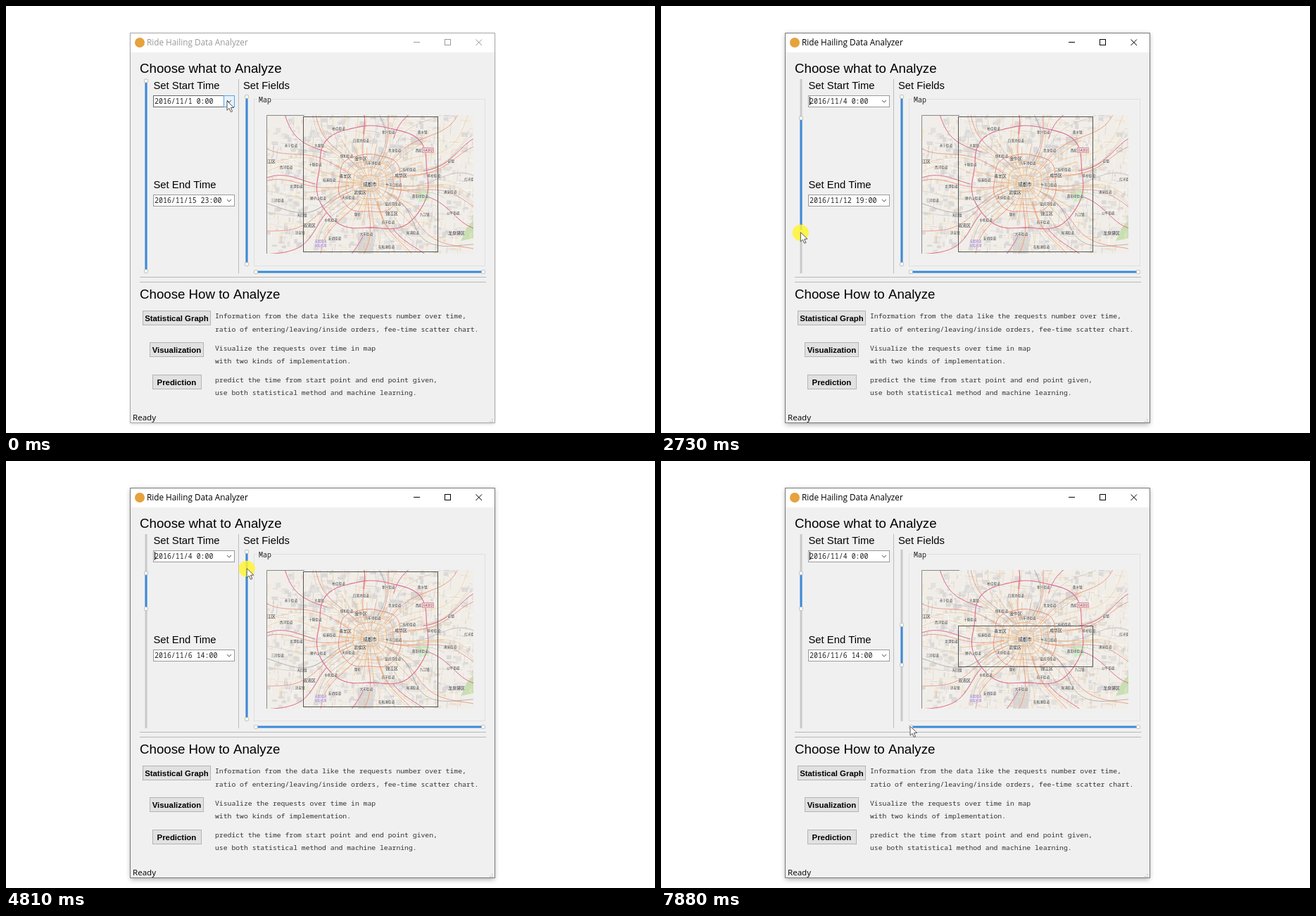
Animation of 922x607 px, one loop 8000 ms. Source, as an HTML page with a canvas:

```html
<!DOCTYPE html>
<html lang="en">
<head>
<meta charset="utf-8">
<title>Ride Hailing Data Analyzer</title>
<style>
html, body { margin: 0; width: 100%; height: 100%; overflow: hidden; background: #fff; }
canvas { display: block; width: 922px; height: 607px; }
</style>
</head>
<body>
<canvas id="stage" width="922" height="607"></canvas>
<script>
const LOOP = 8000;
const ctx = document.getElementById('stage').getContext('2d');
const ARIAL = '"Liberation Sans", Arial, sans-serif';
const UI = '"Open Sans", "Noto Sans CJK SC", sans-serif';
const CJK = '"Noto Sans CJK SC", "Noto Sans CJK", sans-serif';
const MONO = '"Noto Sans Mono", monospace';
const FIELD_FONT = '300 9.95px ' + MONO;
const BLUE = '#0078d7', TRACK = '#3b8ad8';

function makeRandom(seed) {
  return () => {
    seed = (seed * 1664525 + 1013904223) >>> 0;
    return seed / 4294967296;
  };
}

function label(g, text, x, y, font, color = '#000', align = 'left') {
  g.font = font;
  g.fillStyle = color;
  g.textAlign = align;
  g.fillText(text, x, y);
}

function box(g, x, y, w, h, fill, border) {
  if (fill) { g.fillStyle = fill; g.fillRect(x, y, w, h); }
  if (border) {
    g.strokeStyle = border;
    g.lineWidth = 1;
    g.strokeRect(x + .5, y + .5, w - 1, h - 1);
  }
}

function shape(g, points, fill, stroke, width = 1) {
  g.beginPath();
  points.forEach(([x, y]) => g.lineTo(x, y));
  if (fill) { g.closePath(); g.fillStyle = fill; g.fill(); }
  if (stroke) { g.strokeStyle = stroke; g.lineWidth = width; g.stroke(); }
}

function line(g, color, width, x1, y1, x2, y2) {
  shape(g, [[x1, y1], [x2, y2]], null, color, width);
}

function disc(g, x, y, r, fill, border) {
  g.beginPath();
  g.arc(x, y, r, 0, 2 * Math.PI);
  g.fillStyle = fill;
  g.fill();
  if (border) { g.strokeStyle = border; g.lineWidth = .8; g.stroke(); }
}

// ---- Map -----------------------------------------------------------------

const MAP = { x: 370, y: 155, w: 294, h: 197 };
const CITY = { x: 517, y: 254 };
const DISTRICTS = [
  ['金牛区', 504, 217], ['青羊区', 482, 242], ['成华区', 561, 241], ['武侯区', 503, 265],
  ['锦江区', 548, 295], ['双流区', 431, 312], ['龙泉驿区', 640, 323], ['温江区', 374, 221]
];
const TOWNS = ('牛市口街道 天府街道 万年场街道 猛追湾街道 桂溪街道 二仙桥街道 簇桥 保和街道 ' +
  '黄田坝街道 狮子山街道 青龙街道 石羊街道 十陵街道 蔡桥街道 中和街道 白莲池街道 九江镇 ' +
  '龙潭街道 西航港街道 大丰街道 大面镇 涌泉街道 天回镇 新兴街道 犀浦街道 西河街道 彭镇 ' +
  '安靖街道 柏合街道 公平街道 三河街道 黄水镇 石板滩街道 永宁街道 红光街道 洪安镇').split(' ');

// Line from radius a to b at the given angle, with a sideways swing
function radial(g, angle, a, b, swing, color, width) {
  const points = [];
  for (let r = a; r <= b; r += 6) {
    const q = angle + swing * Math.sin(r / 26 + angle * 5);
    points.push([CITY.x + r * Math.cos(q), CITY.y - 2 + r * Math.sin(q) * .9]);
  }
  shape(g, points, null, color, width);
}

function ring(g, r, color, width) {
  const points = [];
  for (let a = 0; a <= 6.4; a += .08) {
    const k = r * (1 + .05 * Math.cos(4 * a + 3) + .02 * Math.sin(7 * a));
    const lift = r > 60 ? 8 : 0;
    points.push([CITY.x + lift / 2 + k * Math.cos(a), CITY.y - 2 - lift + k * Math.sin(a) * .93]);
  }
  shape(g, points, null, color, width);
}

function drawStreets(g, rnd) {
  const spot = power => {
    const r = Math.pow(rnd(), power) * 180, a = rnd() * 2 * Math.PI;
    return [CITY.x + r * Math.cos(a), CITY.y + r * Math.sin(a) * .75];
  };
  for (let i = 0; i < 600; i++) {
    const [x, y] = spot(.7);
    box(g, x, y, 2 + rnd() * 7, 2 + rnd() * 6, i % 2 ? '#e3e0de' : '#dad8d8');
  }
  box(g, 500, 322, 22, 30, '#d8d6d5');
  box(g, 575, 186, 17, 12, '#d8d6d5');
  shape(g, [[583, 264], [602, 261], [601, 276], [588, 279]], '#c9efc3');
  shape(g, [[664, 304], [654, 316], [646, 334], [664, 330]], '#c9dfb1');

  const tones = ['#fff', '#f3dcb4', '#c9c7c7', '#f3ecc0', '#d0cecd', '#efc9a4'];
  for (let i = 0; i < 1300; i++) {
    const [x, y] = spot(.65);
    const a = .1 + i % 2 * Math.PI / 2, len = 4 + rnd() * 13;
    line(g, tones[Math.floor(rnd() * 6)], .4 + rnd() * .3,
      x, y, x + Math.cos(a) * len, y + Math.sin(a) * len);
  }
}

function drawRoads(g, rnd) {
  for (let i = 0; i < 40; i++)
    radial(g, i * 2.4 + rnd(), 20 + rnd() * 60, 110 + rnd() * 80, .12, i % 2 ? '#c4c1bf' : '#efc490', .6);
  for (let i = 0; i < 26; i++)
    radial(g, i * Math.PI / 13 + rnd() * .1, 9, 60 + rnd() * 50, .03, '#efb070', .7);
  [13, 25, 35].forEach(r => ring(g, r, '#f0ab72', .8));
  ring(g, 46, '#e98673', .9);
  for (let i = 0; i < 13; i++)
    radial(g, i * Math.PI / 6.5 + .2, 30, 190, .09, '#eb8c74', .8);
  ring(g, 82, '#dd6c8c', 1.1);
  for (let i = 0; i < 9; i++)
    radial(g, i * Math.PI / 4.5 + .35, 78, 190, .1, '#dd6c8c', 1);
  for (let i = 0; i < 3; i++)
    radial(g, i * 2.1 + .7, 25, 190, .16, '#8f8b8b', .6);
}

function drawNames(g) {
  const place = (text, x, y, size, color = '#222') => {
    g.font = size + 'px ' + CJK;
    g.textAlign = 'center';
    g.strokeStyle = 'rgba(250,248,244,.7)';
    g.lineWidth = 1;
    g.strokeText(text, x, y + size * .36);
    label(g, text, x, y + size * .36, g.font, color, 'center');
  };
  TOWNS.forEach((name, i) => {
    const r = 24 * Math.sqrt(i + 2), a = i * 2.4;
    place(name, CITY.x + r * Math.cos(a), CITY.y + r * Math.sin(a) * .64, 4.6, '#333');
  });
  DISTRICTS.forEach(([name, x, y]) => place(name, x, y, 5.9));
  place('成都市', CITY.x, CITY.y, 6.4);
  place('成都双流', 447, 334, 4.2, '#8461c4');
  place('国际机场', 447, 340, 4.2, '#8461c4');
  box(g, 591, 201, 17, 8, '#f3d3d6', '#dc93a0');
  place('G4202', 599.5, 205, 4.6, '#7c2438');
}

function drawMap() {
  const c = document.createElement('canvas');
  c.width = MAP.w;
  c.height = MAP.h;
  const g = c.getContext('2d'), rnd = makeRandom(21);
  g.translate(-MAP.x, -MAP.y);
  g.lineJoin = 'round';
  box(g, MAP.x, MAP.y, MAP.w, MAP.h, '#f1eee9');
  drawStreets(g, rnd);
  drawRoads(g, rnd);
  drawNames(g);
  shape(g, [[370.5, 352], [370.5, 155.5], [424, 155.5]], null, '#888');
  return c;
}

// ---- Timeline ------------------------------------------------------------

const glide = u => (u + u * u * (3 - 2 * u)) / 2;
const drag = u => Math.pow(u, 1.45);

const MOVES = [
  { from: 470, to: 1020, x: 321, y: 190, ease: glide },
  { from: 1350, to: 2140, x: 199, y: 378, ease: glide },
  { from: 2240, to: 3280, x: 197, y: 211, ease: drag },
  { from: 3530, to: 3870, x: 352, y: 186, ease: glide },
  { from: 3870, to: 4320, x: 343, y: 129, ease: glide },
  { from: 4560, to: 5310, x: 339, y: 245, ease: drag },
  { from: 5500, to: 5900, x: 341, y: 374, ease: glide },
  { from: 5900, to: 6150, x: 342, y: 367, ease: glide },
  { from: 6290, to: 6890, x: 342, y: 291, ease: drag },
  { from: 7180, to: 7520, x: 443, y: 342, ease: glide },
  { from: 7520, to: 7880, x: 354, y: 377, ease: glide }
];
const PRESSES = [[470, 570], [1060, 1180], [2240, 3530], [4510, 5360], [6290, 7180]];
const PICKED = 1180, BLINK = 524;

const progress = (t, from, to) => Math.min(1, Math.max(0, (t - from) / (to - from)));
const mix = (a, b, u) => a + (b - a) * u;

function pointerAt(t) {
  let x = 314, y = 135;
  for (const m of MOVES) {
    const u = m.ease(progress(t, m.from, m.to));
    x = mix(x, m.x, u);
    y = mix(y, m.y, u);
  }
  return { x, y };
}

function stateAt(t) {
  const picked = t >= PICKED;
  const endY = mix(377, 210, drag(progress(t, 2240, 3280)));
  const hours = Math.round(359 - (377 - endY) / .742);
  const upper = progress(t, 4820, 5310), lower = drag(progress(t, 6330, 6890));
  return {
    pointer: pointerAt(t),
    endY,
    top: mix(129, 233, upper),
    bottom: mix(367, 290, lower),
    rectTop: mix(157, 234, upper),
    rectBottom: mix(349, 292, lower),
    active: t >= 470,
    popup: t >= 580 && !picked,
    hover: t < 580,
    startY: picked ? 159.5 : 106.5,
    start: `2016/11/${picked ? 4 : 1} 0:00`,
    end: `2016/11/${1 + Math.floor(hours / 24)} ${hours % 24}:00`,
    pressed: PRESSES.some(([a, b]) => t >= a && t < b),
    caret: picked && Math.floor((t - PICKED) / BLINK) % 2 === 0
  };
}

// ---- Widgets -------------------------------------------------------------

function drawWindow(active) {
  const ink = active ? '#000' : '#999';
  box(ctx, 0, 0, 922, 607, '#fff');
  ctx.save();
  ctx.shadowColor = active ? 'rgba(0,0,0,.32)' : 'rgba(0,0,0,.2)';
  ctx.shadowBlur = active ? 7 : 4;
  ctx.shadowOffsetY = active ? 2 : 1;
  box(ctx, 177, 38, 517, 555, '#f0f0f0');
  ctx.restore();
  box(ctx, 177, 38, 517, 28, '#fff');
  box(ctx, 176, 38, 519, 555, null, active ? '#7a7a7a' : '#ababab');
  disc(ctx, 190, 52, 7, '#e6a23c');
  label(ctx, 'Ride Hailing Data Analyzer', 200, 56, '11.75px ' + UI, ink);
  line(ctx, ink, 1, 579, 51.5, 588, 51.5);
  box(ctx, 623, 47, 9, 9, null, ink);
  line(ctx, ink, 1, 667.5, 47.5, 676, 56);
  line(ctx, ink, 1, 676, 47.5, 667.5, 56);
  label(ctx, 'Ready', 180, 588.5, '11.6px ' + UI);
  for (const [x, y] of [[690, 587], [690, 590], [687, 590]]) box(ctx, x, y, 1.5, 1.5, '#c4c4c4');
}

function drawLabels() {
  const big = '18.7px ' + ARIAL, mid = '14.8px ' + ARIAL;
  label(ctx, 'Choose what to Analyze', 190, 94.5, big);
  label(ctx, 'Choose How to Analyze', 190, 415.5, big);
  label(ctx, 'Set Start Time', 209.5, 118.2, mid);
  label(ctx, 'Set End Time', 209.5, 259, mid);
  label(ctx, 'Set Fields', 337, 118.2, mid);
  line(ctx, '#bdbdbd', 1, 330.5, 104, 330.5, 380);
  line(ctx, '#b8b8b8', 1, 190, 385.5, 682, 385.5);
  line(ctx, '#b8b8b8', 1, 190, 392.5, 682, 392.5);
  const actions = [
    ['Statistical Graph', 97, 'Information from the data like the requests number over time,',
      'ratio of entering/leaving/inside orders, fee-time scatter chart.'],
    ['Visualization', 77, 'Visualize the requests over time in map',
      'with two kinds of implementation.'],
    ['Prediction', 70, 'predict the time from start point and end point given,',
      'use both statistical method and machine learning.']
  ];
  actions.forEach(([name, w, ...rows], i) => {
    const y = 433 + Math.round(i * 45.3);
    box(ctx, Math.round(242.5 - w / 2), y, w, 21, '#e1e1e1', '#b4b4b4');
    label(ctx, name, 242.4, y + 14.8, 'bold 11.4px ' + ARIAL, '#000', 'center');
    rows.forEach((row, k) =>
      label(ctx, row, 297, 444.3 + i * 45.2 + k * 18.3, '9.75px ' + MONO, '#333'));
  });
}

function drawCombo(text, y, hover, caret) {
  box(ctx, 209, y, 116, 17, '#fff', hover ? '#666' : '#9a9a9a');
  if (hover) box(ctx, 309, y, 16, 17, '#e5f1fb', '#5aa5e0');
  shape(ctx, [[314, y + 7], [317, y + 10], [320, y + 7]], null, '#555');
  label(ctx, text, 211, y + 12, FIELD_FONT, '#222');
  if (caret) line(ctx, '#000', 1, 211.5, y + 2, 211.5, y + 14);
}

function handle(x, y) {
  ctx.beginPath();
  ctx.roundRect(x - 2.4, y - 2.4, 4.8, 4.8, .8);
  ctx.fillStyle = '#fff';
  ctx.fill();
  ctx.strokeStyle = '#a8a8a8';
  ctx.lineWidth = .7;
  ctx.stroke();
}

function drawSlider(x, from, to, a, b) {
  box(ctx, x - 1.5, from, 3, to - from, '#c9c9c9');
  box(ctx, x - 1.5, a, 3, b - a, TRACK);
  handle(x, a);
  handle(x, b);
}

function drawField(s, map) {
  box(ctx, 352, 132, 329, 238, null, '#e0e0e0');
  box(ctx, 357, 129, 21, 8, '#f0f0f0');
  label(ctx, 'Map', 359, 136.5, FIELD_FONT, '#222');
  ctx.drawImage(map, MAP.x, MAP.y);
  ctx.strokeStyle = '#555';
  ctx.lineWidth = 1;
  ctx.strokeRect(422.5, s.rectTop + .5, 191, s.rectBottom - s.rectTop);
  box(ctx, 355, 376.5, 324, 3, TRACK);
  handle(355, 378);
  handle(678, 378);
}

function drawArrow(x, dir) {
  disc(ctx, x, 151.5, 6.3, '#d9d9d4', '#8c8c88');
  line(ctx, '#777', 1.6, x - 3.5 * dir, 151.5, x + 3 * dir, 151.5);
  shape(ctx, [[x, 148], [x + 3.5 * dir, 151.5], [x, 155]], null, '#777', 1.6);
}

function drawCalendar() {
  ctx.save();
  ctx.shadowColor = 'rgba(0,0,0,.5)';
  ctx.shadowBlur = 3;
  ctx.shadowOffsetX = ctx.shadowOffsetY = 1.5;
  box(ctx, 209, 143, 179, 173, '#fff');
  ctx.restore();
  box(ctx, 209, 143, 179, 17.5, BLUE);
  drawArrow(217.5, -1);
  drawArrow(378, 1);
  label(ctx, '十一月', 261, 156, '11.7px ' + CJK, '#fff');
  label(ctx, '2016', 311, 156, '11px "Noto Serif", serif', '#fff');
  shape(ctx, [[295.5, 154.5], [301.5, 154.5], [298.5, 157.5]], '#fff');

  const colX = c => 222 + c * 25.5;
  const dayColor = c => c > 4 ? '#f00' : '#000';
  [...'一二三四五六日'].forEach((d, c) =>
    label(ctx, '周' + d, colX(c), 176.3, '11.7px ' + CJK, dayColor(c), 'center'));
  for (let i = 0; i < 42; i++) {
    const c = i % 7, x = colX(c), y = 183 + Math.floor(i / 7) * 22.1;
    const inMonth = i >= 1 && i <= 30, chosen = i === 1;
    if (i < 1 || i > 15) box(ctx, x - 12.75, y, 25.5, 22.1, '#f0f0f0');
    if (chosen) box(ctx, x - 12, y, 25, 22, BLUE);
    const day = i < 1 ? 31 : inMonth ? i : i - 30;
    const color = chosen ? '#fff' : inMonth ? dayColor(c) : '#808080';
    label(ctx, day, x, y + 15.2, '11.75px ' + UI, color, 'center');
  }
}

function drawPointer({ x, y }, pressed) {
  if (pressed) disc(ctx, x, y + .5, 11.5, 'rgba(255,244,50,.85)');
  const arrow = [[0, 0], [0, 13.2], [3.1, 10.4], [5.4, 15.6], [7.6, 14.7], [5.4, 9.6], [9.6, 9.4], [0, 0]];
  shape(ctx, arrow.map(([dx, dy]) => [x + dx, y + dy]), '#fff', '#444', .9);
}

function draw(t, map) {
  const s = stateAt(t);
  drawWindow(s.active);
  drawLabels();
  drawSlider(199, 104, 380, s.startY, s.endY);
  drawSlider(342, 126, 370, s.top, s.bottom);
  drawField(s, map);
  drawCombo(s.start, 127, s.hover, s.caret);
  drawCombo(s.end, 268, false, false);
  if (s.popup) drawCalendar();
  drawPointer(s.pointer, s.pressed);
}

const map = drawMap();
const began = performance.now();
function tick() {
  draw((performance.now() - began) % LOOP, map);
  requestAnimationFrame(tick);
}
tick();
</script>
</body>
</html>
```
